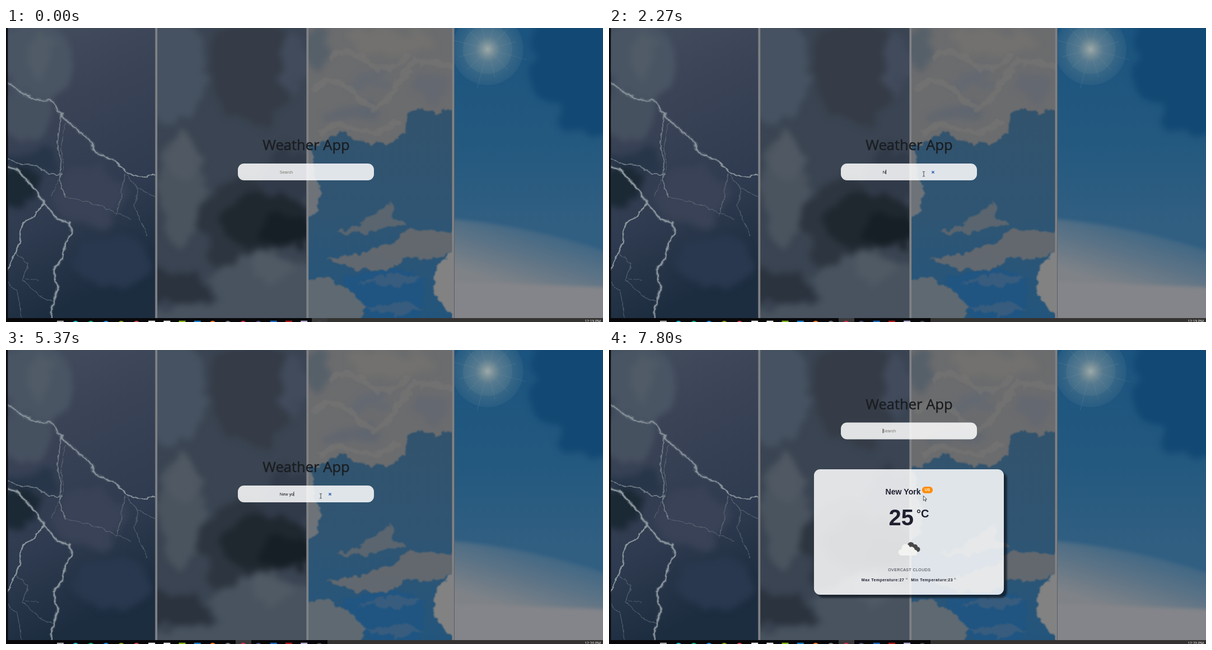
An HTML page for the animation above (8000 ms loop, 1066 by 525 pixels).

```html
<!DOCTYPE html>
<html lang="en">
<head>
<meta charset="utf-8">
<title>Weather App</title>
<style>
  html, body { margin: 0; width: 1066px; height: 525px; overflow: hidden; background: #0a0c10; }
  #stage { position: relative; width: 1066px; height: 525px; overflow: hidden; }
  #stage > * { position: absolute; left: 0; top: 0; }
  #stage > div { background: rgba(255, 255, 255, .85); border-radius: 11px; }
  #stage > #box { left: 414px; top: 241.5px; width: 243px; height: 30.5px; }
  #stage > #card { left: 366px; top: 212.8px; width: 339.3px; height: 224.4px;
    box-shadow: 5.5px 5.5px 3px rgba(16, 24, 34, .75); }
  text { font-family: "Liberation Sans", Arial, sans-serif; white-space: pre; }
  .ui { font-family: "Open Sans", "Noto Sans", sans-serif; }
  .bold { font-weight: bold; fill: #1e2030; }
  .soft { filter: url(#soft); }
  .ragged { filter: url(#ragged); }
  .bolt { filter: url(#jag); fill: none; stroke: #87929a; stroke-linejoin: round; }
</style>
</head>
<body>
<div id="stage">
<svg width="1066" height="525">
  <defs>
    <filter id="soft" filterUnits="userSpaceOnUse" x="-60" y="-60" width="1190" height="660" color-interpolation-filters="sRGB">
      <feTurbulence type="fractalNoise" baseFrequency=".025" numOctaves="5" seed="4"/>
      <feColorMatrix values="1 0 0 0 0  0 1 0 0 0  0 0 1 0 0  0 0 0 0 1"/>
      <feDisplacementMap in="SourceGraphic" scale="48" xChannelSelector="R" yChannelSelector="G"/>
      <feGaussianBlur stdDeviation="6"/>
    </filter>
    <filter id="ragged" filterUnits="userSpaceOnUse" x="-60" y="-60" width="1190" height="660" color-interpolation-filters="sRGB">
      <feTurbulence type="fractalNoise" baseFrequency=".06" numOctaves="4" seed="9"/>
      <feColorMatrix values="1 0 0 0 0  0 1 0 0 0  0 0 1 0 0  0 0 0 0 1"/>
      <feDisplacementMap in="SourceGraphic" scale="18" xChannelSelector="R" yChannelSelector="G"/>
      <feGaussianBlur stdDeviation="1.2"/>
    </filter>
    <filter id="jag" filterUnits="userSpaceOnUse" x="-60" y="-60" width="1190" height="660" color-interpolation-filters="sRGB">
      <feTurbulence type="fractalNoise" baseFrequency=".09" numOctaves="2" seed="2"/>
      <feColorMatrix values="1 0 0 0 0  0 1 0 0 0  0 0 1 0 0  0 0 0 0 1"/>
      <feDisplacementMap in="SourceGraphic" scale="7" xChannelSelector="R" yChannelSelector="G"/>
      <feGaussianBlur stdDeviation=".5"/>
    </filter>
    <linearGradient id="storm" x2=".25" y2="1">
      <stop stop-color="#434e5e"/><stop offset=".35" stop-color="#3a4356"/>
      <stop offset=".7" stop-color="#2f3b50"/><stop offset="1" stop-color="#1d2d40"/>
    </linearGradient>
    <linearGradient id="clear" x2="0" y2="1">
      <stop stop-color="#1b547f"/><stop offset=".4" stop-color="#24597f"/><stop offset=".68" stop-color="#315f82"/>
    </linearGradient>
    <linearGradient id="haze" gradientUnits="userSpaceOnUse" x1="950" y1="350" x2="915" y2="465">
      <stop stop-color="#3b6584"/><stop offset=".5" stop-color="#5c7386"/><stop offset="1" stop-color="#7f8388"/>
    </linearGradient>
    <linearGradient id="sky" x2="0" y2="1">
      <stop offset=".3" stop-color="#32536d"/><stop offset=".65" stop-color="#2f5573"/><stop offset="1" stop-color="#23557c"/>
    </linearGradient>
    <radialGradient id="sun">
      <stop stop-color="#b4bab2" stop-opacity=".85"/><stop offset=".16" stop-color="#96a2a0" stop-opacity=".75"/>
      <stop offset=".35" stop-color="#82959a" stop-opacity=".5"/><stop offset=".75" stop-color="#6d8c98" stop-opacity=".27"/>
      <stop offset="1" stop-color="#6d8c98" stop-opacity=".12"/>
    </radialGradient>
  </defs>

  <!-- thunderstorm -->
  <svg x="3.5" width="263" height="518" viewBox="3.5 0 263 518">
    <rect width="270" height="518" fill="url(#storm)"/>
    <g class="soft">
      <ellipse cx="55" cy="65" rx="62" ry="75" fill="#4a5564"/>
      <ellipse cx="58" cy="50" rx="22" ry="32" fill="#505b67"/>
      <ellipse cx="30" cy="155" rx="50" ry="45" fill="#465160"/>
      <ellipse cx="45" cy="238" rx="48" ry="24" fill="#28364a"/>
      <ellipse cx="18" cy="285" rx="36" ry="36" fill="#1b2935"/>
      <ellipse cx="150" cy="300" rx="60" ry="55" fill="#394256"/>
      <ellipse cx="190" cy="420" rx="70" ry="45" fill="#29384e"/>
    </g>
    <g class="bolt">
      <path stroke-width="6" opacity=".22" d="M0 246L20 252 35 270 50 285 68 312 90 340 112 348 118 365 105 385 102 410 85 432 92 465 82 500 80 525M0 94L30 118 60 130 80 128 95 150 108 165 130 185 150 200 160 222 195 238"/>
      <path stroke-width="2" d="M0 94L30 118 60 130 80 128 95 150 108 165 130 185 150 200 160 222 195 238 215 258 240 266 270 262"/>
      <path stroke-width="2.8" d="M0 246L20 252 35 270 50 285 68 312 90 340 112 348 118 365 105 385 102 410 85 432 92 465 82 500 80 525M68 312L50 335 28 350 25 380 15 405 0 435"/>
      <path stroke-width="2" opacity=".7" d="M100 152L95 180 92 205 98 240 96 270 104 302M0 235L30 243 55 246 78 262 100 262"/>
      <path stroke-width="1.2" opacity=".45" d="M104 302L140 308 185 325 225 342M212 260L206 300 196 335M215 262L235 285 230 322 252 370M235 285L268 302M106 170L98 215 104 250 82 300M18 400L38 420 30 450 60 478 84 490M3 455L20 470 28 518M34 448L60 450"/>
    </g>
  </svg>

  <!-- dark clouds -->
  <svg x="270" width="266.5" height="518" viewBox="270 0 266.5 518">
    <rect x="270" width="267" height="518" fill="#3a4452"/>
    <g class="soft">
      <ellipse cx="290" cy="70" rx="65" ry="100" fill="#465261"/>
      <ellipse cx="440" cy="75" rx="72" ry="95" fill="#353c47"/>
      <ellipse cx="512" cy="65" rx="26" ry="55" fill="#414b5c"/>
      <ellipse cx="425" cy="350" rx="80" ry="85" fill="#2d3640"/>
      <ellipse cx="315" cy="285" rx="42" ry="108" fill="#4a545f"/>
      <ellipse cx="320" cy="225" rx="28" ry="42" fill="#505963"/>
      <ellipse cx="505" cy="265" rx="42" ry="50" fill="#313a49"/>
      <ellipse cx="465" cy="345" rx="78" ry="50" fill="#1f272f"/>
      <ellipse cx="505" cy="362" rx="52" ry="32" fill="#171f26"/>
      <path fill="#2b333e" d="M250 425L340 440 380 470 370 495 310 498 250 480Z"/>
      <path fill="#48535f" d="M362 445L400 412 445 405 480 395 515 408 560 430V560H240V505L350 498 395 480Z"/>
      <ellipse cx="475" cy="425" rx="40" ry="22" fill="#505a65"/>
    </g>
  </svg>

  <!-- broken clouds -->
  <svg x="540" width="256.5" height="518" viewBox="540 0 256.5 518">
    <rect x="540" width="257" height="518" fill="url(#sky)"/>
    <path class="ragged" fill="#6b6c6e" d="M500-40H840V138L796 146 765 152 740 143 718 153 712 186 690 203 655 206 625 200 602 184 578 197 560 206 500 205Z"/>
    <g class="soft">
      <ellipse cx="550" cy="35" rx="24" ry="45" fill="#566069"/>
      <ellipse cx="620" cy="150" rx="55" ry="18" fill="#60666f"/>
      <ellipse cx="690" cy="25" rx="80" ry="25" fill="#72716f"/>
      <ellipse cx="760" cy="105" rx="32" ry="20" fill="#646870"/>
      <ellipse cx="655" cy="92" rx="38" ry="14" fill="#646971"/>
    </g>
    <g class="ragged">
      <path fill="none" stroke="#777674" stroke-width="11" opacity=".6" d="M545 110Q590 75 625 120T690 115 730 60 800 70M560 192Q590 160 625 180T700 165M575 55Q610 30 645 60T720 45"/>
      <path fill="#6d7379" d="M500 210L548 218 552 270 562 300 558 325 540 342 500 345Z"/>
      <path fill="#1e5686" opacity=".7" d="M600 445L700 428 750 450 735 525 680 535 630 500Z"/>
      <path fill="#62696f" opacity=".85" d="M592 366L630 352 658 330 688 312 692 335 716 352 670 358 640 366Z"/>
      <path fill="#6d6d6e" opacity=".85" d="M572 412L640 400 690 385 715 362 820 362V395L760 412 715 410 680 432 620 432Z"/>
      <path fill="#676c71" opacity=".9" d="M500 462L570 445 600 455 622 480 645 500 620 540H500Z"/>
      <path fill="#506478" opacity=".5" d="M630 452L690 440 745 446 700 462ZM640 500L700 488 745 500 700 514Z"/>
      <path fill="#828282" d="M830 385L785 408 764 440 762 475 785 500 830 530Z"/>
    </g>
  </svg>

  <!-- sunny -->
  <svg x="801" width="265" height="518" viewBox="801 0 265 518">
    <rect x="801" width="265" height="518" fill="url(#clear)"/>
    <path class="soft" fill="#124974" d="M925-60H1130V205L1010 180 950 130Z"/>
    <circle cx="860" cy="38" r="64" fill="url(#sun)"/>
    <circle cx="860" cy="38" r="44" fill="#8fa2a3" fill-opacity=".1"/>
    <g id="rays" stroke="#8a9da2" stroke-opacity=".22"></g>
    <path fill="url(#haze)" d="M780 340Q930 350 1090 405V540H780Z" style="filter:blur(3px)"/>
    <path fill="#84858a" d="M780 452Q930 458 1090 464V540H780Z" style="filter:blur(3px)"/>
  </svg>

  <path fill="#808286" d="M266.3 0h3.9v518h-3.9zM536.3 0h3.9v518h-3.9zM796.3 0h4.4v518h-4.4z"/>

  <!-- taskbar -->
  <path fill="#08080a" d="M0 518h1066v7H0z"/>
  <path fill="#353331" d="M574 518h492v7H574z"/>
  <path id="active" fill="#3a3a3c" d="M0 518h28v7H0z"/>
  <g id="icons"></g>
  <text id="clock" class="ui" x="1062" y="526" font-size="6.67" text-anchor="end" fill="#fff"></text>
</svg>

<div id="box"></div>
<div id="card"></div>

<svg width="1066" height="525">
  <g id="form">
    <text class="ui" x="536" y="218" font-size="25.6" font-weight="500" text-anchor="middle" fill="#1b1e21" stroke="#1b1e21" stroke-width=".5">Weather App</text>
    <text id="hint" x="488.8" y="259.6" font-size="7.4" fill="#77736f">Search</text>
    <text id="typed" x="488.8" y="259.6" font-size="7.4" fill="#111"></text>
    <path id="squiggle" stroke="#e02828" stroke-width=".9"/>
    <path id="clear-mark" stroke="#2a5fa9" stroke-width="1.4" d="M576.4 255.4l4.2 4.2m0-4.2l-4.2 4.2"/>
    <rect id="caret" y="253" width=".9" height="8" fill="#111"/>
  </g>
  <g id="result">
    <text class="bold" x="493.4" y="258" font-size="14.2">New York</text>
    <rect x="559" y="244" width="19" height="11.8" rx="5.6" fill="#ff8c00"/>
    <text x="568.5" y="252.4" font-size="6.9" font-weight="bold" text-anchor="middle" fill="#fff">US</text>
    <text class="bold" x="499.5" y="313" font-size="40">25</text>
    <text class="bold" x="549" y="299" font-size="20">°C</text>
    <g fill="#484849"><circle cx="539" cy="349" r="6"/><circle cx="546.5" cy="351.5" r="4.5"/><circle cx="551" cy="356" r="4.5"/><path d="M535 350h12v10h-12z"/></g>
    <g fill="#f2f2f1"><circle cx="530" cy="354" r="7.6"/><circle cx="540" cy="357" r="5.8"/><circle cx="522.5" cy="361.3" r="5.7"/><circle cx="545.5" cy="361.8" r="5.2"/><path d="M522 356h24v11h-24z"/></g>
    <text x="536.2" y="394.6" font-size="7.1" letter-spacing=".38" text-anchor="middle" fill="#343640">OVERCAST CLOUDS</text>
    <g font-size="7.1" letter-spacing=".44">
      <text class="bold" x="450.8" y="413.4">Max Temperature:27</text>
      <text class="bold" x="539.3" y="413.4">Min Temperature:23</text>
    </g>
    <g font-size="3.8"><text x="529.3" y="410.3">°C</text><text x="615.6" y="410.3">°C</text></g>
  </g>
  <g id="pointer">
    <path id="arrow" fill="#fff" stroke="#222" stroke-width=".8" d="M.4.4V9l2.1-1.9 1.4 3.1 1.3-.6-1.4-3H6.4z"/>
    <path id="beam" fill="none" stroke="#333" stroke-width=".9" d="M-2-4.2h1.4l.6.6.6-.6H2M0-3.6v7.2M-2 4.2h1.4L0 3.6l.6.6H2"/>
  </g>
</svg>
</div>

<script>
const $ = id => document.getElementById(id);
const show = (id, on) => $(id).style.display = on ? '' : 'none';
const latest = (keys, t) => keys.findLast(key => key[0] <= t);

const LOOP = 8000, FOCUS = 1400, SUBMIT = 7800;
const TEXT_X = 488.8, SHIFT = -112.5;

// time, text, caret visible
const typing = [
  [0, '', 0], [FOCUS, '', 1], [1950, '', 0], [2270, 'N', 1], [2740, '', 1], [2820, '', 0],
  [3350, '', 1], [3830, '', 0], [4130, 'N', 1], [4360, 'Ne', 1], [4440, 'New', 1],
  [4520, 'New ', 1], [5080, 'New ', 0], [5220, 'New y', 1], [5370, 'New yo', 1],
  [5540, 'New yor', 1], [5600, 'New york', 1], [5770, 'New york ', 1], [6320, 'New york ', 0],
  [6470, 'New york c', 1], [6620, 'New york ci', 1], [6850, 'New york cit', 1],
  [7010, 'New york city', 1], [7560, 'New york city', 0], [SUBMIT, '', 1]
];

// time, x, y, shape
const moves = [
  [0, 0, 0, ''], [330, 974.5, 508, 'arrow'], [410, 850, 435, 'arrow'], [485, 745, 372, 'arrow'],
  [560, 684.5, 337.5, 'arrow'], [790, 640, 312, 'arrow'], [865, 600, 287, 'arrow'],
  [940, 574, 272, 'arrow'], [1020, 564, 265.3, 'beam'], [1100, 562.5, 262, 'beam'],
  [1170, 562, 260.7, 'beam'], [7720, 561, 260, 'arrow']
];

const iconColors = ['#aaa', '#1fb5c9', '#12a880', '#1f86d6', '#8a9a22', '#d04848', '#eee', '#eee', '#86b817',
  '#1680c8', '#f07a28', '#777', '#d8334a', '#4c4a78', '#1766c0', '#b01818', '#b9b4d8', '#444'];
const squareIcons = [0, 6, 7, 8, 9, 14, 15, 16];
$('icons').innerHTML = iconColors.map((color, i) => {
  const x = 97 + 27.2 * i, square = squareIcons.includes(i);
  return `<rect x="${x - 6}" y="522.7" width="12" height="12" rx="${square ? 0 : 6}" fill="${color}"/>`;
}).join('');

$('rays').innerHTML = Array.from({ length: 12 }, (_, i) =>
  `<path d="M14 0H${i % 3 ? 52 : 72}" transform="translate(860 38) rotate(${i * 30 + 15})"/>`).join('');

function drawForm(t) {
  const [, text, caretOn] = latest(typing, t);
  const typed = $('typed');
  typed.textContent = text;
  const width = text ? typed.getComputedTextLength() : 0;
  show('hint', !text);
  show('clear-mark', text);
  show('caret', caretOn);
  $('caret').setAttribute('x', TEXT_X + width);

  const misspelt = text.startsWith('New york ');
  show('squiggle', misspelt);
  if (misspelt) {
    const start = TEXT_X + typed.getSubStringLength(0, 4);
    $('squiggle').setAttribute('d', `M${start} 260.7h${typed.getSubStringLength(4, 4)}`);
  }
}

function draw() {
  const t = performance.now() % LOOP;
  drawForm(t);

  const done = t >= SUBMIT;
  show('card', done);
  show('result', done);
  $('box').style.transform = done ? `translateY(${SHIFT}px)` : '';
  $('form').setAttribute('transform', `translate(0 ${done ? SHIFT : 0})`);

  const [, x, y, shape] = latest(moves, t);
  show('arrow', shape === 'arrow');
  show('beam', shape === 'beam');
  $('pointer').setAttribute('transform', `translate(${x} ${y})`);

  $('active').setAttribute('transform', `translate(${t < FOCUS + 90 ? 546 : 410} 0)`);
  $('clock').textContent = t < 3990 ? '12:19 PM' : '12:20 PM';
  requestAnimationFrame(draw);
}
draw();
</script>
</body>
</html>
```
